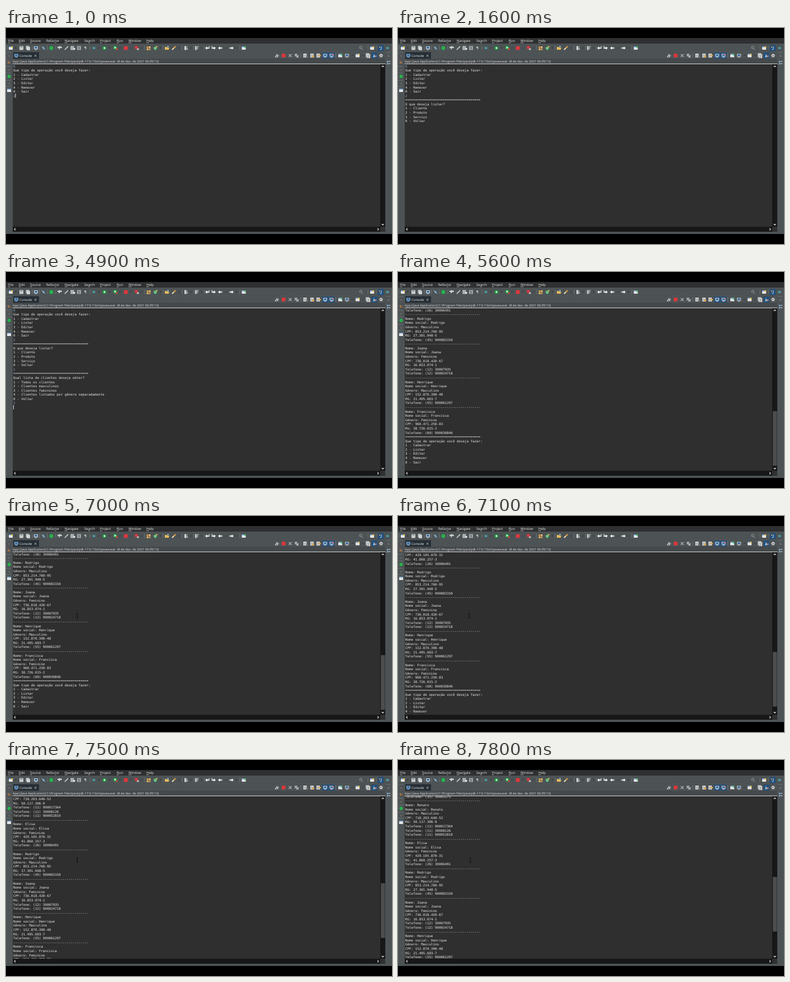
Animation of 690x388 px, one loop 8 s. Source, as an HTML page:

```html
<!DOCTYPE html>
<html lang="pt">
<head>
<meta charset="utf-8">
<title>Console</title>
<style>
html, body { margin: 0; width: 100%; height: 100%; overflow: hidden; background: #000; }
svg { display: block; width: 690px; height: 388px; }
text { white-space: pre; text-rendering: geometricPrecision; }
.ui { font: 6px "Open Sans", "Noto Sans", sans-serif; fill: #eee; }
.info { font-size: 5.76px; fill: #ddd; }
#out { font: 5.885px "DejaVu Sans Mono", monospace; fill: #ebebeb; }
#out .in { fill: #8cafd2; }
u { text-decoration: underline; }
</style>
</head>
<body>
<svg viewBox="0 0 690 388">
  <defs><clipPath id="view"><rect x="12" y="65" width="657" height="292"/></clipPath></defs>
  <g id="ui"></g>
  <g clip-path="url(#view)"><g id="out"></g></g>
  <rect id="caret" width="1" height="7.6" fill="#e4e4e4"/>
  <rect id="thumb" x="670" width="7.5" height="98" fill="#4d4d4d"/>
  <path id="mouse" d="M-1.6-4H-.4L0-3.6L.4-4H1.6M0-3.6V3.6M-1.6 4H-.4L0 3.6L.4 4H1.6" fill="none" stroke="#080808" stroke-width=".9"/>
</svg>
<script>
const $ = id => document.getElementById(id);
const ROW = 7.585, CHAR = 3.543, NOTCH = 16.95;

// ---- window frame and icons ----
const rect = (x, y, w, h, c) => `<rect x="${x}" y="${y}" width="${w}" height="${h}" fill="${c}"/>`;
const dot = (x, y, r, c) => `<circle cx="${x}" cy="${y}" r="${r}" fill="${c}"/>`;
const line = (x, y, d, c, w = 1) =>
  `<path transform="translate(${x} ${y})" d="${d}" fill="none" stroke="${c}" stroke-width="${w}"/>`;
const fill = (x, y, d, c) => `<path transform="translate(${x} ${y})" d="${d}" fill="${c}"/>`;
const label = (x, y, s, cls = '') => `<text class="ui ${cls}" x="${x}" y="${y}">${s}</text>`;
const drop = (x, y = 36) => fill(x, y, 'M-1.5-.7H1.5L0 1Z', '#25292b');
const grip = (x, y = 36) => line(x, y, 'M0-4V4', '#8b9092', 1).replace('/>', ' stroke-dasharray="1 1"/>');
const hgrip = (x, y) => line(x, y, 'M-4 0H4', '#8b9092').replace('/>', ' stroke-dasharray="1 1"/>');
const page = (x, y, c = '#ddd', mark = '#777') =>
  rect(x - 3, y - 3.5, 6, 7, c) + line(x, y, 'M-2-1.5H2M-2 .2H2M-2 2H1', mark, .7);
const win = (x, y, mark) => rect(x - 3.5, y - 3, 7, 6, '#e6e6e6') +
  rect(x - 3.5, y - 3, 7, 1.5, '#6a9fce') + (mark ? dot(x + 2.4, y - 1.8, 1.5, mark) : '');
const screen = (x, y, c = '#d5dde4') => rect(x - 3.5, y - 3, 7, 5, c) +
  rect(x - 2.5, y - 2, 5, 3, '#35699c') + rect(x - 2, y + 2.5, 4, 1, c);
const play = (x, y) => dot(x, y, 3.3, '#21a545') + fill(x, y, 'M-1-2L2 0L-1 2Z', '#fff');
const bug = (x, y) => line(x, y, 'M-3-2L3 2M3-2L-3 2M-3.2 0H3.2', '#74878b', .6) + dot(x, y, 1.9, '#3ba9b5');
const arrow = (x, dir) => `<g transform="translate(${x} 36) scale(${dir} 1)">` +
  fill(0, 0, 'M4 0L.5-3V-1H-3.5V1H.5V3Z', '#f0f0f0') + '</g>';
const cross = (x, y, s, c) => line(x, y, `M${-s}${-s}L${s} ${s}M${s}${-s}L${-s} ${s}`, c, 1.4);
const lit = (x, y) => rect(x - 5.5, y - 5.5, 11, 11, '#264f78');

const frame = [
  rect(0, 18, 690, 352, '#4d5355'), rect(0, 18, 690, 10, '#2f3031'),
  rect(13, 43.5, 46, 11.5, '#252d35'), rect(12, 55, 666, 9, '#45494b'),
  rect(12, 64, 666, 1, '#dcdcdc'), rect(12, 65, 657, 292, '#2f2f2f'),
  rect(669, 65, 9, 292, '#171717'), rect(12, 357, 657, 9, '#171717'), rect(669, 357, 9, 9, '#303030'),
  line(673.6, 69, 'M-2 1L0-1L2 1', '#eee', 1.1), line(673.6, 353, 'M-2-1L0 1L2-1', '#eee', 1.1),
  line(16, 361.6, 'M1-2L-1 0L1 2', '#eee', 1.1), line(665, 361.6, 'M-1-2L1 0L-1 2', '#eee', 1.1)
];

const menu = [[4, '_File'], [23, '_Edit'], [43, '_Source'], [72, 'Refac_tor'], [105, '_Navigate'],
  [140, 'Se_arch'], [168, '_Project'], [198, '_Run'], [219, '_Window'], [251, '_Help']
].map(([x, s]) => label(x, 25.2, s.replace(/_(.)/, '<tspan text-decoration="underline">$1</tspan>')));

const tools = [
  ...[2, 47, 60, 74, 89, 150, 248, 281, 315, 336, 355, 418, 647].map(x => grip(x)),
  ...[17, 166, 185, 204, 223, 242, 276, 309, 331, 350, 393, 412].map(x => drop(x)),
  win(8.5, 36, '#f2c94c'),
  rect(24, 32.5, 7, 7, '#c9cccd'), rect(25.5, 32.5, 4, 2.4, '#8d9294'),
  rect(35.5, 32, 6, 6, '#b4b8ba'), rect(37, 34, 6, 6, '#d2d5d6'),
  screen(53.5, 36), dot(67, 36, 2.2, '#5b8fb4'), line(67, 36, 'M-3-3L3 3', '#c5d2db'),
  dot(81, 36, 3.5, '#26b34b'),
  fill(96, 36, 'M-4-2L0-3.5L4-2V0H1L-1 3L-2 0H-4Z', '#c8cccd'),
  line(108, 36, 'M-3 3L3-3', '#cfd3d4', 1.7), page(118.5, 36, '#c7cbcc'), rect(120.5, 36, 3, 3, '#e8e8e8'),
  rect(127, 32.5, 7, 7, '#a9aeb0'), line(130.5, 36, 'M-2-1.5H2M-2 .2H2M-2 2H2', '#3e4345', .7),
  label(140, 38.3, '¶'),
  bug(157, 36), play(176, 36), play(195, 35.3), rect(196.5, 36.5, 3, 3, '#d8443c'),
  rect(211, 32.8, 6.5, 6.5, '#e2353b'), rect(230.5, 32.5, 5, 5, '#e2353b'), rect(234, 36.5, 3.5, 3, '#b9bdbf'),
  rect(251.5, 33, 3, 3, '#d99a4e'), rect(255.3, 33, 3, 3, '#f0c46a'), rect(251.5, 36.7, 3, 3, '#f0c46a'),
  rect(255.3, 36.7, 3, 3, '#d99a4e'),
  dot(267, 36.3, 3.1, '#3aa55a'), line(267, 36.3, 'M1.3-1A1.6 1.6 0 1 0 1.3 1', '#fff', .8), dot(269.5, 33.5, 1.2, '#f2c94c'),
  fill(288, 36, 'M-4 3V-2H-1L0-1H3V0H4L2.5 3Z', '#e6b95c'), rect(288, 32.4, 3, 2, '#8fb7da'),
  line(300, 36, 'M-3 3L0 0', '#efe4cd', 2), line(300, 36, 'M0 0L3.2-3', '#e8a33f', 2.3),
  rect(319, 32.5, 3, 7, '#d3d6d8'), line(323.5, 36, 'M0-3V3M-1.6 1L0 3L1.6 1', '#c8cccd'),
  rect(338, 32.5, 3, 7, '#c3c7c9'), line(342.5, 36, 'M2-3H0V2', '#d3d6d8'),
  arrow(360, -1), arrow(371, 1), dot(363.3, 33.5, 1.1, '#ddd'), dot(368.3, 33.5, 1.1, '#ddd'),
  arrow(383, -1), arrow(403, 1), win(425, 36, '#3fb56a'),
  line(635, 36, 'M1 1L3.3 3.5M1.5-1A2.2 2.2 0 1 1 -2.9-1A2.2 2.2 0 1 1 1.5-1', '#9da3a5', .9),
  win(654.5, 36, '#f2c94c'), grip(662),
  lit(670, 36), line(670, 36, 'M1-3V1.5Q1 3-1.5 2.5', '#9cc8ee', 1.2), dot(668, 34.5, 1.2, '#d99a4e'), bug(682, 36)
];

const tab = [
  screen(18.5, 49.5, '#8fb9e0'), label(24, 52, 'Console'), cross(52.7, 49.8, 1.8, '#ddd').replace('1.4', '.8'),
  label(12, 62, 'App [Java Application] C:\\Program Files\\Java\\jdk-17.0.1\\bin\\javaw.exe  (8 de dez. de 2021 06:09:13)', 'info'),
  line(484.5, 49.5, 'M-3 2L0-2L1 2L3-1M-3.5 2.5H0', '#e2e2e2', 1.1), rect(493, 46.2, 6.5, 6.5, '#e2353b'),
  cross(508, 49.5, 2.5, '#a8adaf'), cross(518.3, 48.5, 2.2, '#c2c6c8'), cross(521, 51, 2, '#c2c6c8'),
  grip(527, 49.5), page(534.5, 49.5), rect(536, 50, 3, 3, '#888'),
  page(547, 49.5), rect(547.5, 49.5, 3.3, 3.3, '#e0ab48'), page(558, 49.5), rect(559.5, 48, 3, 3, '#e0ab48'),
  lit(570.5, 49.5), screen(570.5, 49.5), lit(582, 49.5), screen(582, 49.5), rect(583, 47, 2.5, 2, '#db5b52'),
  grip(589.5, 49.5), win(597.5, 49.5, '#3fb56a'), screen(609.5, 49.5, '#c8cccd'), drop(619, 49.5),
  win(628.5, 49.5, '#f2c94c'), drop(638, 49.5), page(646, 48.7, '#bfc3c5'), page(648, 50.3),
  lit(659, 49.5), fill(659, 49.5, 'M-3 3L-1-3L1 3Z', '#9cc8ee'), dot(661, 50.5, 1.4, '#dd7d54'),
  dot(670.5, 49.5, 2.4, '#e0e0e0'), line(670.5, 49.5, 'M-3.5 0H3.5M0-3.5V3.5M-2.4-2.4L2.4 2.4M2.4-2.4L-2.4 2.4', '#e0e0e0', .9),
  dot(670.5, 49.5, 1.1, '#4d5355')
];

const sides = [
  ...[44, 69, 81, 94, 105].map(y => hgrip(5.5, y)), hgrip(684, 44),
  rect(3.5, 49, 3.5, 2.5, '#6c6560'), rect(3, 59.5, 2.2, 4.5, '#a9753f'), rect(5.7, 60.5, 2.2, 3.5, '#7d6a56'),
  rect(3.5, 74, 3.5, 2.5, '#6c6560'), dot(5.5, 87, 3, '#26b34b'), rect(3.5, 99, 3.5, 2.5, '#6c6560'),
  win(5.5, 112), rect(682, 49, 3.5, 2.5, '#6b7173'),
  rect(681, 59, 2.4, 2.4, '#8fc1ea'), rect(681, 63, 2.4, 2.4, '#8fc1ea'), line(685.3, 62, 'M-1-2H2M-1 2H2', '#dbe7f0')
];
$('ui').innerHTML = [frame, menu, tools, tab, sides].flat().join('');

// ---- console contents; a leading ">" marks typed input ----
const bar = '='.repeat(38), rule = '-'.repeat(38);
const mainMenu = ['Que tipo de operação você deseja fazer:', '1 - Cadastrar', '2 - Listar', '3 - Editar',
  '4 - Remover', '0 - Sair'];
const listMenu = [bar, 'O que deseja listar?', '1 - Cliente', '2 - Produto', '3 - Serviço', '0 - Voltar'];
const clientMenu = [bar, 'Qual lista de clientes deseja obter?', '1 - Todos os clientes', '2 - Clientes masculinos',
  '3 - Clientes femininos', '4 - Clientes listados por gênero separadamente', '0 - Voltar'];
const client = (name, sex, cpf, rg, ...phones) => [rule, 'Nome: ' + name, 'Nome social: ' + name,
  'Gênero: ' + sex + 'ino', 'CPF: ' + cpf, 'RG: ' + rg, ...phones.map(p => 'Telefone: ' + p)];

const stages = [[0, ['>0', ...mainMenu, '>2']], [1100, listMenu], [2400, ['>1']], [2900, clientMenu], [4100, ['>1']]];
const listing = ['Telefone: (35) 30001273',
  ...client('Renato', 'Mascul', '718.203.640-52', '50.117.306-9', '(11) 900017364', '(11) 30008126', '(11) 900052810'),
  ...client('Elisa', 'Femin', '429.105.870-31', '41.860.257-3', '(26) 30006491'),
  ...client('Rodrigo', 'Mascul', '853.214.760-95', '27.301.948-5', '(45) 900083150'),
  ...client('Joana', 'Femin', '736.018.420-67', '16.853.074-1', '(12) 30007935', '(12) 900024718'),
  ...client('Henrique', 'Mascul', '152.870.390-48', '21.495.603-7', '(55) 900061297'),
  ...client('Francisca', 'Femin', '960.471.250-83', '38.726.015-2', '(60) 900030846'),
  bar, ...mainMenu, ''];
const FIRST = 38 - listing.length;

// [from, to, row, column]
const carets = [[0, 600, 7, 1], [1000, 1600, 8, 0], [2200, 2400, 8, 0], [2400, 2900, 14, 1], [2900, 3500, 15, 0],
  [4000, 4100, 15, 0], [4100, 4600, 22, 1], [4900, 5000, 23, 0]];
const wheel = [7100, 7200, 7300, 7400, 7500, 7700, 7800];

const show = (id, on) => $(id).setAttribute('visibility', on ? 'visible' : 'hidden');
const move = (id, x, y) => $(id).setAttribute('transform', `translate(${x} ${y})`);
let shown = '';

function draw(t) {
  const listed = t >= 5000;
  const rows = listed ? listing : stages.filter(s => t >= s[0]).flatMap(s => s[1]);
  const first = listed ? FIRST : 0;
  const html = rows.map((s, i) => {
    const typed = s[0] === '>';
    return `<text${typed ? ' class="in"' : ''} x="13" y="${70.6 + (first + i) * ROW}">${typed ? s.slice(1) : s}</text>`;
  }).join('');
  if (html !== shown) $('out').innerHTML = shown = html;

  const scroll = wheel.filter(w => t >= w).length * NOTCH;
  move('out', 0, scroll);
  move('thumb', 0, 250 - scroll * .336);
  show('thumb', listed);

  const c = carets.find(([a, b]) => t >= a && t < b);
  show('caret', c);
  if (c) move('caret', 13 + c[3] * CHAR, 64.6 + c[2] * ROW);

  const p = 1 - (1 - Math.min(1, Math.max(0, (t - 6600) / 400))) ** 2;
  show('mouse', t >= 6600);
  if (t < 7600) move('mouse', 5 + 122.3 * p, 48 + 131.5 * p);
  else move('mouse', 129.3, 180.3);
}

function tick() {
  draw(Math.floor(performance.now() % 8000 / 100) * 100);
  requestAnimationFrame(tick);
}
tick();
</script>
</body>
</html>
```
